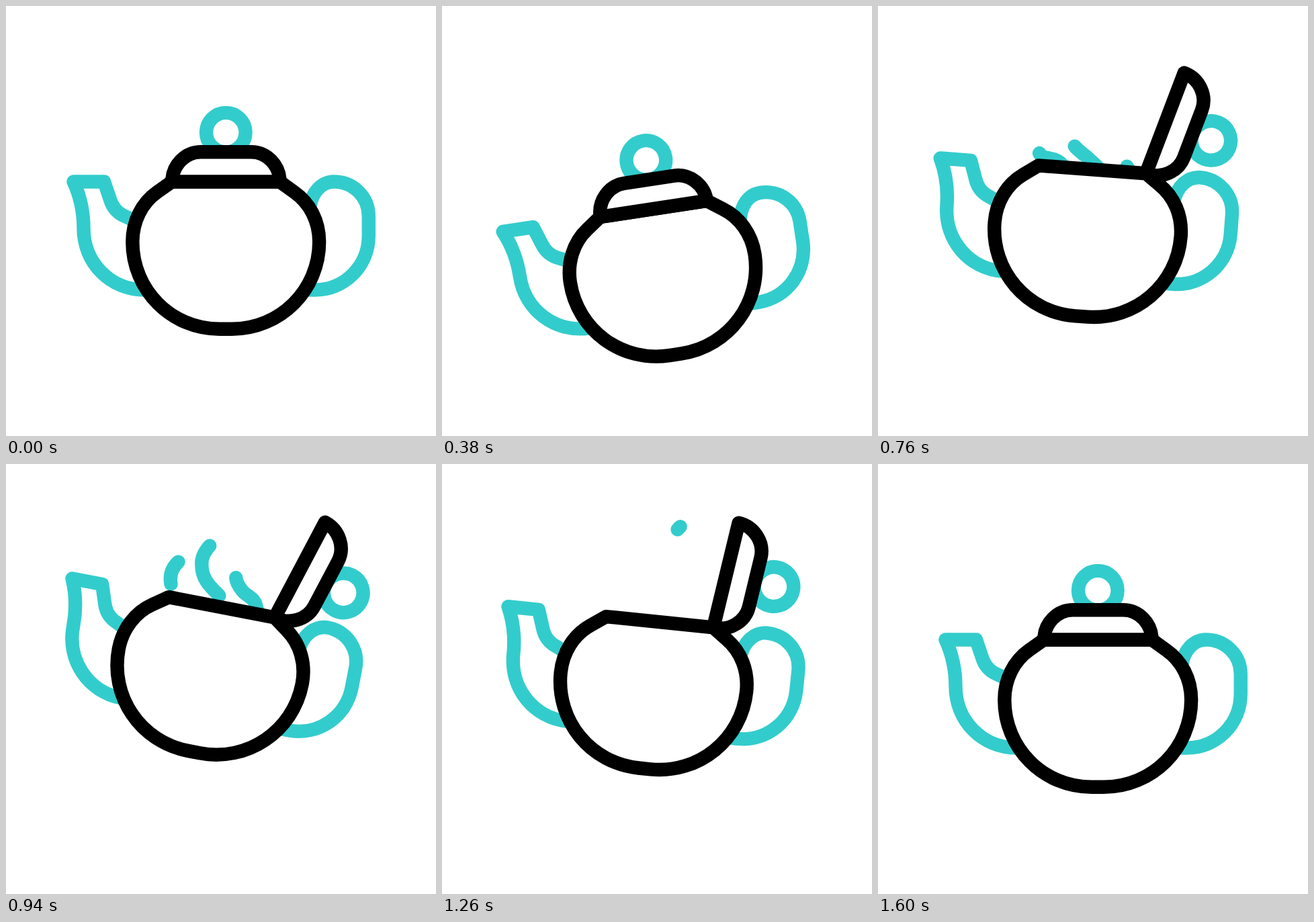
An HTML page that plays this animation: 640x640 px, repeating every 2400 ms.

```html
<!DOCTYPE html>
<html lang="en">
<head>
<meta charset="utf-8">
<title>Teapot</title>
<style>
  html, body { margin: 0; width: 100%; height: 100%; overflow: hidden; background: #fff; }
  svg { display: block; width: 100%; height: 100%; }
  path, circle { fill: none; stroke: #3cc; stroke-width: 20.4; stroke-linecap: round; stroke-linejoin: round; }
  .solid { fill: #fff; stroke: #000; }
</style>
</head>
<body>
<svg viewBox="0 0 640 640">
  <g id="pot">
    <path d="M206 422.500C155 422.500 115.500 382 115.500 331C115.500 307 110 282 100.500 261.500H146L155 288C158 298 164 306 173 311L190 319"/>
    <path d="M452 300C455 277 470 261.500 488 261.500C517 261.500 539.800 284 539.800 313V342C539.800 387 504 422.500 460 422.500H440"/>
    <path class="steam" pathLength="100" data-head="510" data-tail="778" d="M290 268C276 240 252 256 246.500 242C241 228 244 216 252 206C258 199 262 187 262 174"/>
    <path class="steam" pathLength="100" data-head="575" data-tail="875" d="M345 268C336 256 329 253 320 245C304 234 290 226 286 205C283 194 287 185 291 177C302 160 322 140 322 105"/>
    <path class="steam" pathLength="100" data-head="690" data-tail="911" d="M390 272L378 252C373 237 360 239 352 231C345 225 340 219 339 211C334 185 323 144 338 124L349 109.500"/>
    <path class="solid" d="M247 261.500L225 277C202 293 188.300 321 188.300 351C188.300 423 246 480.800 318 480.800H336C408 480.800 466.200 423 466.200 351C466.200 320 452 293 429 277L407.500 261.500Z"/>
    <g id="lid">
      <circle cx="327.300" cy="188.200" r="29.300"/>
      <path class="solid" d="M247.300 261.500C247.300 237 267 217.300 290 217.300H365C388 217.300 407.500 237 407.500 261.500Z"/>
    </g>
  </g>
</svg>
<script>
const LOOP = 2400, STEP = 20;
const DIP = 455, LIFT = 950, REST = 1600;
const HEAD_TIME = 600, TAIL_TIME = 380;

const pot = document.getElementById('pot');
const lid = document.getElementById('lid');
const steam = document.querySelectorAll('.steam');

const ramp = (t, from, to) => Math.min(1, Math.max(0, (t - from) / (to - from)));
const smooth = u => u * u * (3 - 2 * u);
const ease = (t, from, to) => smooth(ramp(t, from, to));

function draw(t) {
  const dip = ease(t, 0, DIP), lift = ease(t, DIP, LIFT), settle = ease(t, LIFT, REST);
  const sink = ramp(t, 0, DIP) ** 0.85;

  const x = 327 + dip - 24 * lift + 23 * settle;
  const y = 351 + 46 * sink - 96 * lift + 50 * settle;
  const tilt = -9.3 * dip + 20.2 * lift - 10.9 * settle;
  pot.setAttribute('transform', `translate(${x} ${y}) rotate(${tilt}) translate(-327 -351)`);

  const open = 107 * (ease(t, DIP, 772) - ease(t, 1185, REST));
  lid.setAttribute('transform', `rotate(${open} 407.5 261.5)`);

  // Each wisp grows from its head, then vanishes from its tail
  for (const wisp of steam) {
    const { head, tail } = wisp.dataset;
    const end = 100 * ramp(t, +head, +head + HEAD_TIME);
    const start = 100 * ramp(t, +tail, +tail + TAIL_TIME);
    wisp.style.visibility = end > start ? 'visible' : 'hidden';
    wisp.style.strokeDasharray = `${Math.max(0.01, end - start)} 300`;
    wisp.style.strokeDashoffset = -start;
  }
}

const origin = performance.now();
function frame() {
  const t = (performance.now() - origin) % LOOP;
  draw(Math.floor(t / STEP) * STEP);
  requestAnimationFrame(frame);
}
frame();
</script>
</body>
</html>
```
